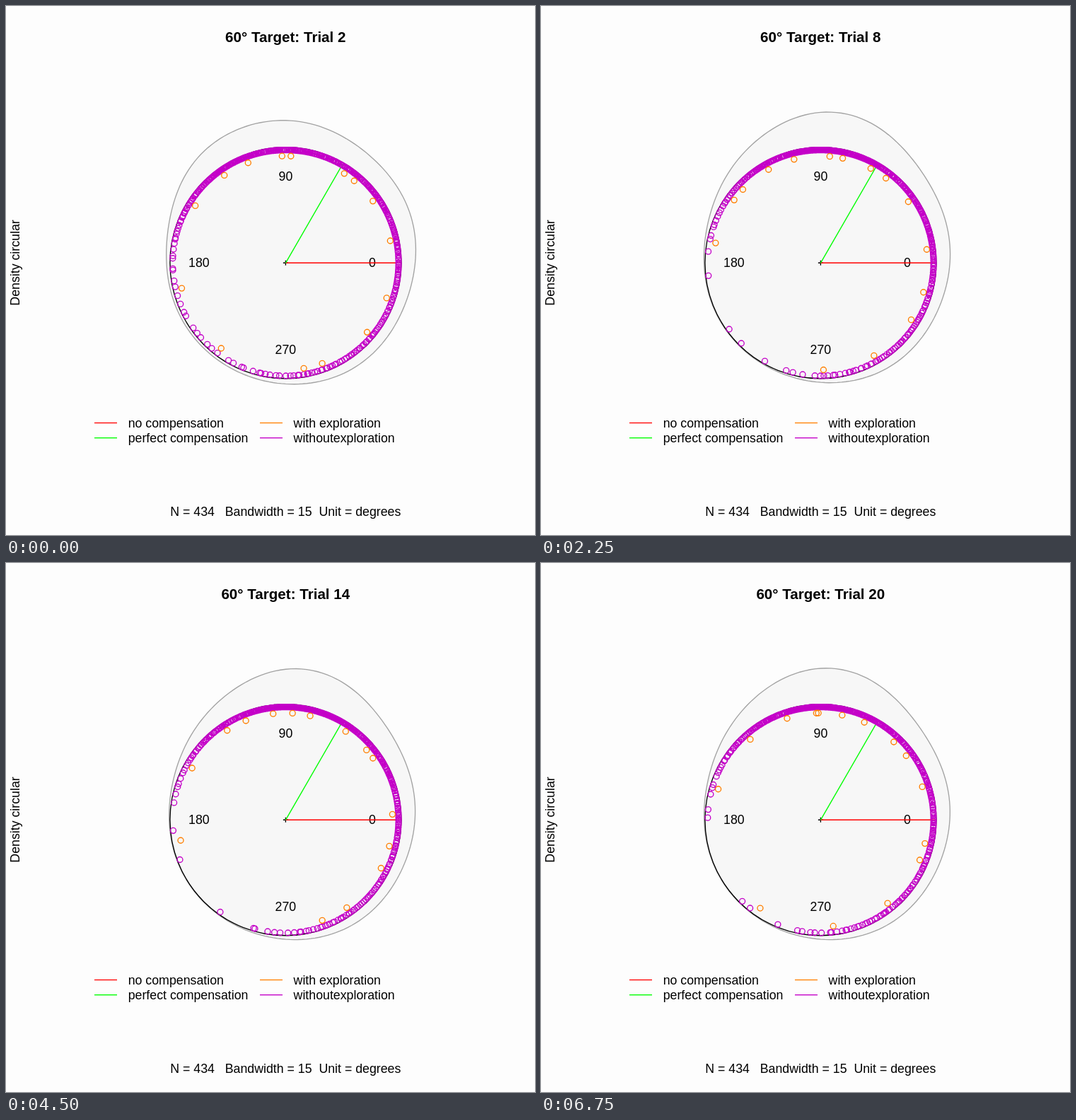
Animation, 748 px wide and 748 px high, one loop 7.5 s. Source, as an HTML page:

```html
<!DOCTYPE html>
<html lang="en">
<head>
<meta charset="utf-8">
<title>60° Target</title>
<style>
  html, body { margin: 0; width: 100%; height: 100%; overflow: hidden; background: #fdfdfd; }
  svg { display: block; width: 100vw; height: 100vh; }
  text { font: 17.75px "Liberation Sans", Arial, sans-serif; fill: #000; white-space: pre; }
  .mid { text-anchor: middle; }
  .title { font-size: 20.6px; font-weight: bold; }
  .line { fill: none; stroke-width: 1.35; }
  .black { stroke: #000; }
  .red { stroke: #f00; }
  .green { stroke: #0f0; }
  .orange { stroke: #ff7f00; }
  .purple { stroke: #c400c8; }
  .density { fill: #f7f7f7; stroke: #a3a3a3; stroke-width: 1.35; }
  .trial { visibility: hidden; animation: show 7500ms step-end infinite; }
  @keyframes show {
    0% { visibility: visible; }
    10%, 100% { visibility: hidden; }
  }
</style>
</head>
<body>
<svg viewBox="0 0 748 748">
  <g id="outlines"></g>
  <g transform="translate(395.4 363.3)">
    <circle class="line black" r="163.5"/>
    <path class="line black" d="M-3.500 0h7M0-3.500v7"/>
    <g class="mid">
      <text x="122.500" y="6">0</text>
      <text y="-116.500">90</text>
      <text x="-122.500" y="6">180</text>
      <text y="128.500">270</text>
    </g>
    <path class="line red" d="M0 0h163.500"/>
    <path class="line green" d="M0 0h163.500" transform="rotate(-60)"/>
  </g>
  <g id="points"></g>
  <path class="line red" d="M125 589.500h32"/>
  <path class="line green" d="M125 610.700h32"/>
  <path class="line orange" d="M359 589.500h32"/>
  <path class="line purple" d="M359 610.700h32"/>
  <text x="172.700" y="595.700">no compensation</text>
  <text x="172.700" y="617">perfect compensation</text>
  <text x="406.600" y="595.700">with exploration</text>
  <text x="406.600" y="617">withoutexploration</text>
  <text class="mid" x="395.300" y="720.500">N = 434   Bandwidth = 15  Unit = degrees</text>
  <text class="mid" transform="translate(19 363) rotate(-90)">Density circular</text>
</svg>
<script>
const CX = 395.4, CY = 363.3, RADIUS = 163.5;
const STEP = 750, TRIALS = 10, LOOP = STEP * TRIALS;
const PURPLE_COUNT = 419, ORANGE_COUNT = 15;

function bump(deg, centre, width) {
  const distance = ((deg - centre + 540) % 360) - 180;
  return Math.exp(-((distance / width) ** 2) / 2);
}

// Height of the density above the circle; responses gather near 85° as trials go on
function densityOf(trial) {
  const early = Math.exp(-(trial - 2) / 2.2);
  const peak = 88 - 6.5 * Math.sin(Math.PI * (trial - 2) / 22);
  return deg => 0.3 + 3.2 * early
    + (49 - 19 * early) * bump(deg, peak, 28)
    + (10 + 7 * early) * bump(deg, 130, 22)
    + (18 + 2 * early) * bump(deg, 16 + 9 * early, 28)
    + (12 - 2 * early) * bump(deg, 310, 30);
}

function seeded(seed) {
  return () => (seed = (seed * 16807) % 2147483647) / 2147483647;
}

// Angles drawn evenly, with jitter, from the cumulative weight
function sample(weight, count, random) {
  const step = 0.25, angles = [];
  let total = 0, sum = 0;
  for (let deg = 0; deg < 360; deg += step) total += weight(deg);
  let next = random();
  for (let deg = 0; deg < 360; deg += step) {
    sum += weight(deg) * count / total;
    while (angles.length < count && sum >= next) {
      angles.push(deg + step * random());
      next = angles.length + random();
    }
  }
  return angles;
}

function polar(deg, r) {
  const a = deg * Math.PI / 180;
  return [CX + r * Math.cos(a), CY - r * Math.sin(a)].map(v => v.toFixed(2)).join(' ');
}

function outlinePath(density) {
  const points = Array.from({ length: 180 }, (_, i) => polar(2 * i, RADIUS + density(2 * i)));
  return `M${points.join('L')}Z`;
}

function ringPath(angles, r) {
  return angles.map(deg => `M${polar(deg, r)}m-4 0a4 4 0 1 0 8 0a4 4 0 1 0-8 0`).join('');
}

let outlines = '', points = '';
for (let i = 0; i < TRIALS; i++) {
  const trial = 2 * i + 2;
  const density = densityOf(trial);
  const random = seeded(1000 + 7919 * i);
  const purple = sample(density, PURPLE_COUNT, random);
  const orange = sample(deg => Math.sqrt(density(deg)), ORANGE_COUNT, random);
  const group = `<g class="trial" style="animation-delay:${i * STEP - (i && LOOP)}ms">`;

  outlines += `${group}<path class="density" d="${outlinePath(density)}"/></g>`;
  points += `${group}
    <text class="mid title" x="395.3" y="50.700">60° Target: Trial ${trial}</text>
    <path class="line purple" d="${ringPath(purple, 159.7)}"/>
    <path class="line orange" d="${ringPath(orange, 151.2)}"/></g>`;
}
document.getElementById('outlines').innerHTML = outlines;
document.getElementById('points').innerHTML = points;
</script>
</body>
</html>
```
